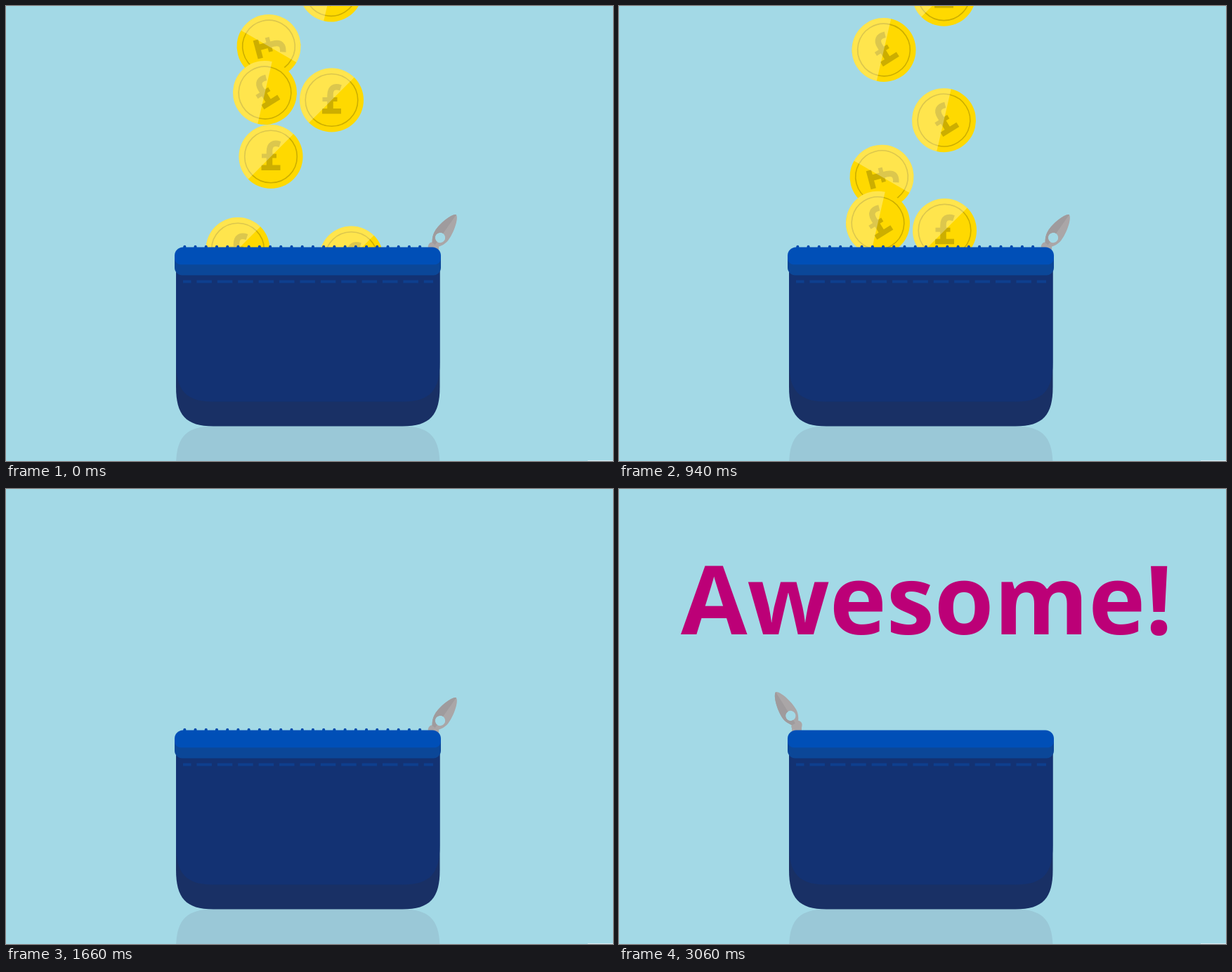
Animation of 864x648 px, one loop 4.61 s. Source, as an HTML page with a canvas:

```html
<!DOCTYPE html>
<html lang="en">
<head>
<meta charset="utf-8">
<title>Coin purse</title>
<style>
html, body { margin: 0; width: 100%; height: 100%; overflow: hidden; background: #a3d9e6; }
canvas { display: block; width: 864px; height: 648px; }
</style>
</head>
<body>
<canvas id="stage" width="864" height="648"></canvas>
<script>
const ctx = document.getElementById('stage').getContext('2d');
const LOOP = 4610, FALL_END = 1660, ZIP_TIME = 1100, TEXT_START = 2660;
const SKY = '#a3d9e6';
const RAD = Math.PI / 180;

// Falling happens in held steps, each a whole number of units.
const UNIT = 16.88;
const fallTimes = [500, 600, 680, 780, 860, 940, 1020, 1100, 1180, 1260, 1340, 1420, 1500, 1580];
const fallUnits = [2, 2, 2, 2, 2, 1, 2, 2, 2, 2, 3, 3, 3, 3];

// x, starting y, rotation in degrees
const coins = [
  [330, 346.5, 0], [491.5, 359, 0],
  [374, 57.5, 75], [368.5, 123.5, -32], [463.5, 134, 0], [377, 214.5, 0],
  [462.5, -23, -32], [377, -123.2, -32], [462.5, -202.4, 0]
];

function rect(x, y, w, h, color) {
  ctx.fillStyle = color;
  ctx.fillRect(x, y, w, h);
}

function roundBox(x, y, w, h, r, color) {
  ctx.beginPath();
  ctx.roundRect(x, y, w, h, r);
  ctx.fillStyle = color;
  ctx.fill();
}

function disc(x, y, r, color) {
  ctx.beginPath();
  ctx.arc(x, y, r, 0, 7);
  ctx.fillStyle = color;
  ctx.fill();
}

function pound() {
  const dark = '#ccae00';
  rect(-13.5, 12, 27, 7.5, dark);
  rect(-13, -4, 21, 6, dark);
  ctx.beginPath();
  ctx.moveTo(-2, 14);
  ctx.lineTo(-2, -7);
  ctx.bezierCurveTo(-2, -18, 4, -20.5, 13, -17.5);
  ctx.lineWidth = 8.5;
  ctx.strokeStyle = dark;
  ctx.stroke();
}

function coin(x, y, angle) {
  ctx.save();
  ctx.translate(x, y);
  ctx.rotate(angle * RAD);
  disc(0, 0, 45.5, '#ffd900');
  ctx.beginPath();
  ctx.arc(0, 0, 37.3, 0, 7);
  ctx.lineWidth = 1.6;
  ctx.strokeStyle = '#ccae00';
  ctx.stroke();
  pound();
  ctx.beginPath();
  ctx.arc(0, 0, 45.5, 135 * RAD, 315 * RAD);
  ctx.fillStyle = 'rgba(255,255,255,0.3)';
  ctx.fill();
  ctx.restore();
}

function drawCoins(t) {
  if (t >= FALL_END) return;
  const units = fallTimes.reduce((sum, at, i) => t >= at ? sum + fallUnits[i] : sum, 0);
  ctx.save();
  ctx.beginPath();
  ctx.rect(0, 0, 864, 356);
  ctx.clip();
  for (const [x, y, angle] of coins) coin(x, y + units * UNIT, angle);
  ctx.restore();
}

function pouch(bottom, color) {
  const l = 242, r = 617.5, top = 365;
  ctx.beginPath();
  ctx.moveTo(l, top);
  ctx.lineTo(l, bottom - 56);
  ctx.bezierCurveTo(l, bottom - 16, l + 14, bottom, l + 53, bottom);
  ctx.lineTo(r - 53, bottom);
  ctx.bezierCurveTo(r - 14, bottom, r, bottom - 16, r, bottom - 56);
  ctx.lineTo(r, top);
  ctx.fillStyle = color;
  ctx.fill();
}

function purse() {
  ctx.save();
  ctx.translate(0, 1197);
  ctx.scale(1, -1);
  pouch(598.5, '#9ac8d7');
  ctx.restore();

  pouch(598.5, '#193065');
  pouch(563.5, '#133273');
  roundBox(240, 350, 379, 33.5, 11, '#0b4798');
  roundBox(240, 343.6, 379, 24.7, [12, 12, 9, 9], '#004fb7');

  ctx.beginPath();
  ctx.moveTo(252, 392.5);
  ctx.lineTo(608, 392.5);
  ctx.lineWidth = 4;
  ctx.strokeStyle = '#0e3f8e';
  ctx.setLineDash([21.5, 7.9]);
  ctx.lineDashOffset = 10;
  ctx.stroke();
  ctx.setLineDash([]);
}

function zipState(t) {
  const step = Math.floor((t - FALL_END) / 100) * 100;
  const k = Math.min(1, Math.max(0, step / ZIP_TIME));
  const p = 0.5 - 0.5 * Math.cos(Math.PI * k);
  return { x: 608.5 - 355.5 * p, y: 343.5 - 6.5 * Math.min(1, p * 1.6), angle: 35 - 67 * p * p };
}

function zipPull({ x, y, angle }) {
  const light = '#aaa6a7', dark = '#9f9b9d';
  ctx.save();
  ctx.translate(x, y);
  rect(-7, 0, 14, 9, light);
  ctx.rotate(angle * RAD);
  ctx.beginPath();
  ctx.ellipse(0, 0, 8, 7, 0, 0, 7);
  ctx.fillStyle = light;
  ctx.fill();
  ctx.beginPath();
  ctx.moveTo(0, -56.5);
  ctx.bezierCurveTo(6, -54, 12, -34, 11.5, -20);
  ctx.bezierCurveTo(11, -13, 8, -8, 5, -4);
  ctx.lineTo(-5, -4);
  ctx.bezierCurveTo(-8, -8, -11, -13, -11.5, -20);
  ctx.bezierCurveTo(-12, -34, -6, -54, 0, -56.5);
  ctx.closePath();
  ctx.moveTo(7.2, -16.5);
  ctx.arc(0, -16.5, 7.2, 0, 7);
  ctx.clip('evenodd');
  rect(-14, -60, 28, 60, light);
  rect(-14, -60, 14, 60, dark);
  ctx.restore();
}

function teeth(limit) {
  for (let i = 0; i < 23; i++) {
    const x = 254.3 + i * 15.22;
    if (x < limit) roundBox(x - 2, 340.8, 4, 6, 2, '#0049ab');
  }
}

function headline(t) {
  const size = Math.min(1, Math.floor((t - TEXT_START) / 100) / 4);
  if (size <= 0) return;
  ctx.save();
  ctx.translate(433, 158);
  ctx.scale(size, size);
  ctx.font = 'bold 137px "Open Sans", "Noto Sans", sans-serif';
  ctx.fillStyle = '#bc0077';
  ctx.fillText('Awesome!', -345, 48.5);
  ctx.restore();
}

function draw(t) {
  rect(0, 0, 864, 648, SKY);
  const zip = zipState(t);
  drawCoins(t);
  zipPull(zip);
  teeth(zip.x - 5);
  purse();
  rect(828, 647.4, 36, 0.6, '#fff');
  headline(t);
}

const start = performance.now();
function tick() {
  draw((performance.now() - start) % LOOP);
  requestAnimationFrame(tick);
}
tick();
</script>
</body>
</html>
```
